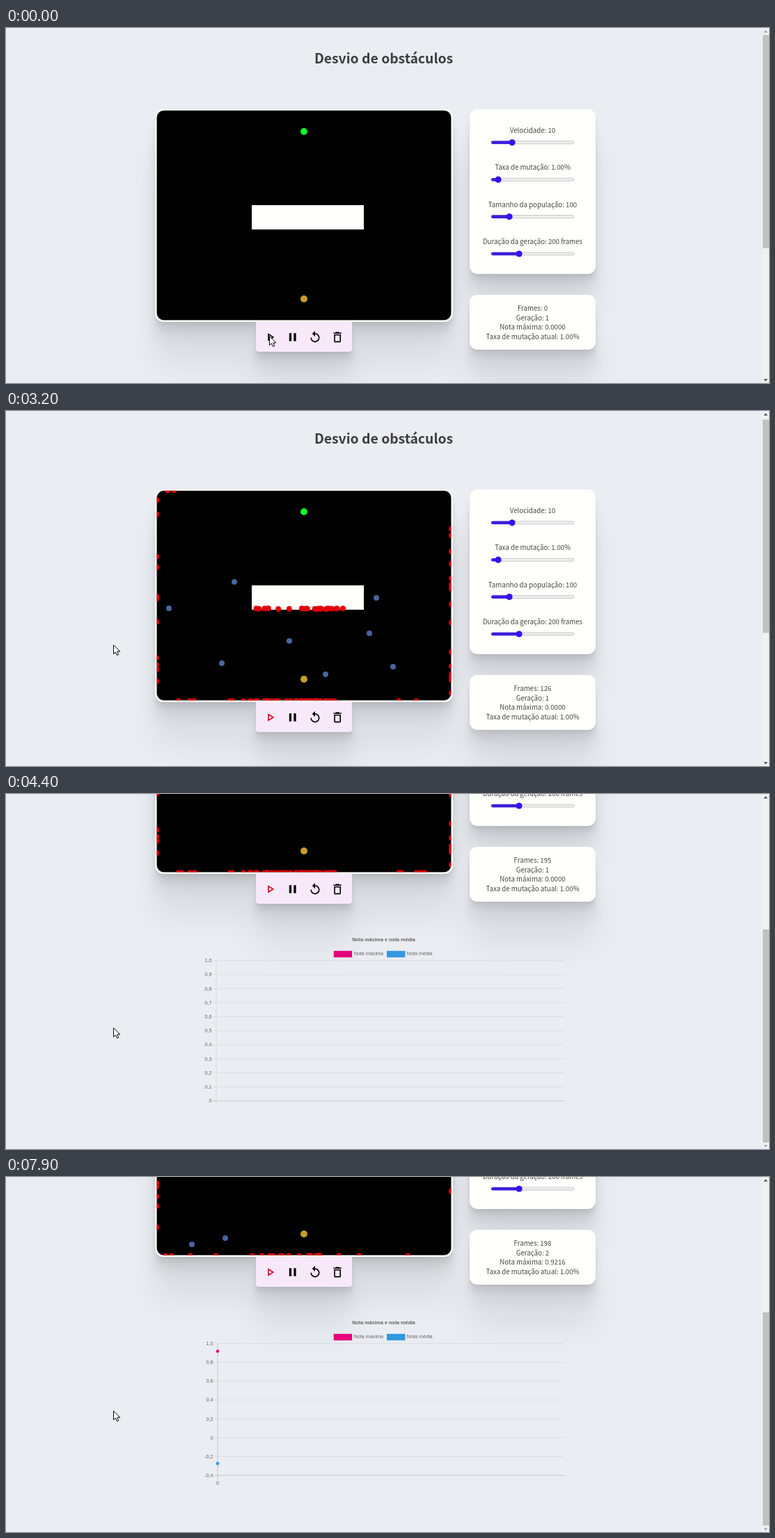
An HTML page with a canvas that plays this animation: 1096x511 px, repeating every 8 s.

```html
<!DOCTYPE html>
<html lang="pt">
<head>
<meta charset="utf-8">
<title>Desvio de obstáculos</title>
<style>
html, body { margin: 0; width: 100%; height: 100%; overflow: hidden; background: #eaedf2; }
#stage { position: relative; width: 1096px; height: 511px; overflow: hidden; }
#page { position: absolute; left: 0; top: 0; width: 1096px; height: 819px; }
#page > *, #over { position: absolute; }
.box {
  box-sizing: border-box; background: #fffffc;
  box-shadow: 0 1.7px 1.3px rgba(0,0,0,.02), 0 4px 3.2px rgba(0,0,0,.028),
    0 7.5px 6px rgba(0,0,0,.035), 0 13.4px 10.7px rgba(0,0,0,.042),
    0 25px 20px rgba(0,0,0,.05), 0 60px 48px rgba(0,0,0,.07);
}
#frame { left: 214px; top: 116.5px; width: 428px; height: 306.5px; border-radius: 12px; }
#bar { left: 359px; top: 423px; width: 138px; height: 43px; border-radius: 0 0 4px 4px; background: #f8e9fa; }
#params { left: 666px; top: 117px; width: 181px; height: 237px; border-radius: 11px; }
#stats { left: 666px; top: 384px; width: 181px; height: 79px; border-radius: 11px; }
#field { left: 216px; top: 118px; background: #000; clip-path: inset(.7px .6px .5px round 10px); }
svg { left: 0; top: 0; }
.ui { font: 9.68px "Noto Sans CJK JP", "Noto Sans CJK SC", "Open Sans", sans-serif; fill: #444; text-anchor: middle; }
.ui .title { font-size: 19.35px; font-weight: 700; fill: #3c3c3c; }
.chart { font: 7.2px "Liberation Sans", Arial, sans-serif; fill: #666; }
.chart line { stroke: rgba(0,0,0,.1); stroke-width: .7; }
.chart line.edge { stroke: rgba(0,0,0,.24); }
</style>
</head>
<body>
<div id="stage">
  <div id="page">
    <div class="box" id="frame"></div>
    <div class="box" id="bar"></div>
    <div class="box" id="params"></div>
    <div class="box" id="stats"></div>
    <canvas id="field" width="424" height="303"></canvas>
    <svg width="1096" height="819">
      <g class="ui" id="ui"><text class="title" x="542.5" y="51">Desvio de obstáculos</text></g>
      <g id="icons">
        <path id="play" d="M10 8.64L15.27 12 10 15.36V8.64M8 5v14l11-7z"/>
        <path d="M6 19h4V5H6zM14 5v14h4V5z"/>
        <path d="M12 5V1L7 6l5 5V7c3.31 0 6 2.69 6 6s-2.69 6-6 6-6-2.69-6-6H4c0 4.42 3.58 8 8 8s8-3.58 8-8-3.58-8-8-8z"/>
        <path d="M6 19c0 1.1.9 2 2 2h8c1.1 0 2-.9 2-2V7H6zM8 9h8v10H8zm7.5-5l-1-1h-5l-1 1H5v2h14V4z"/>
      </g>
      <g class="chart">
        <text x="542.5" y="520.4" text-anchor="middle" font-weight="700">Nota máxima e nota média</text>
        <rect x="470.7" y="533.8" width="26.4" height="9.4" fill="#e6007e"/>
        <text x="499.7" y="540.2">Nota máxima</text>
        <rect x="547" y="533.8" width="26.4" height="9.4" fill="#3498e0"/>
        <text x="575.8" y="540.2">Nota média</text>
        <g id="empty"></g>
        <g id="scored"></g>
      </g>
    </svg>
  </div>
  <svg id="over" width="1096" height="511">
    <rect x="1086" width="10" height="511" fill="#f1f1f1"/>
    <rect id="thumb" x="1087" width="9" height="307" fill="#c1c1c1"/>
    <path id="up" d="M1088.3 6.5h5.8l-2.9-3.4z"/>
    <path id="down" d="M1088.3 505.3h5.8l-2.9 3.4z"/>
    <g id="cursor" fill="#fff" stroke="#000" stroke-linejoin="round">
      <path id="arrow" d="M.5 .8V13.6L3.4 11 5.6 15.6 7.8 14.6 5.7 10.1H9.8Z"/>
      <path id="hand" d="M2.3 9.6V1.6Q3.5 0 4.7 1.6V5.6Q7 4.7 7.7 6.3Q9.3 5.3 10 6.9Q12 6.3 12.2 8.3V11.5Q12 13.5 11 15.6H3.8Q2.5 13-.8 10.4Q-1.5 8.5 .6 8.7Z"/>
    </g>
  </svg>
</div>
<script>
const $ = id => document.getElementById(id);
const clamp = (v, lo, hi) => Math.min(hi, Math.max(lo, v));

function add(parent, tag, attrs, text = "") {
  const el = document.createElementNS("http://www.w3.org/2000/svg", tag);
  for (const k in attrs) el.setAttribute(k, attrs[k]);
  el.textContent = text;
  return parent.appendChild(el);
}

// Linear path through keys [time, ...values].
function track(t, keys) {
  const i = keys.findIndex(k => k[0] > t);
  if (i < 0) return keys[keys.length - 1].slice(1);
  if (!i) return keys[0].slice(1);
  const a = keys[i - 1], b = keys[i], u = (t - a[0]) / (b[0] - a[0]);
  return a.slice(1).map((v, j) => v + (b[j + 1] - v) * u);
}

/* ---- panels ---- */
const label = (y, text) => add($("ui"), "text", { x: 756.5, y }, text);

[["Velocidade: 10", 727], ["Taxa de mutação: 1.00%", 707],
 ["Tamanho da população: 100", 723], ["Duração da geração: 200 frames", 737]].forEach(([text, x], i) => {
  const y = 164.8 + i * 53.4;
  label(y - 13.8, text);
  add($("ui"), "rect", { x: 697.3, y: y - 2, width: 118.4, height: 4, rx: 2, fill: "#efefef", stroke: "#b2b2b2", "stroke-width": .7 });
  add($("ui"), "rect", { x: 697, y: y - 2.3, width: x - 697, height: 4.6, rx: 2.3, fill: "#3a1fdc" });
  add($("ui"), "circle", { cx: x, cy: y, r: 4.6, fill: "#3512f2" });
});

const [count, gen, best] = [0, 1, 2].map(i => label(407 + i * 13.6));
label(447.8, "Taxa de mutação atual: 1.00%");

[...$("icons").children].forEach((el, i) =>
  el.setAttribute("transform", `translate(${379.5 + i * 32.2} 445) scale(.82) translate(-12 -12)`));

/* ---- chart ---- */
const CHART_TOP = 547.7;

function axes(g, x, bottom, rows, low, step) {
  for (let i = 0; i < rows; i++) {
    const y = bottom - i * (bottom - CHART_TOP) / (rows - 1);
    const v = low + i * step;
    const text = Math.abs(v) < .01 ? "0" : v.toFixed(1).replace(".", ",");
    add(g, "line", { x1: x - 5, x2: 802, y1: y, y2: y, class: i ? "" : "edge" });
    add(g, "text", { x: x - 6.6, y: y + 2.4, "text-anchor": "end" }, text);
  }
  return add(g, "line", { x1: x, x2: x, y1: CHART_TOP, y2: bottom + 5 });
}
axes($("empty"), 302, 749.8, 11, 0, .1);
axes($("scored"), 304, 737.4, 8, -.4, .2).setAttribute("class", "edge");
add($("scored"), "text", { x: 304, y: 751, "text-anchor": "middle" }, "0");
const [peak, mean] = ["#e6007e", "#3498e0"].map(fill => add($("scored"), "circle", { cx: 304, r: 2.3, fill }));

/* ---- population ---- */
const START = [428, 390];
const LEFT = 216, RIGHT = 640, TOP = 118, FLOOR = 421.5;

let seed = 1;
const rand = () => (seed = seed * 16807 % 2147483647) / 2147483647;
const between = (a, b) => a + (b - a) * rand();
const bell = () => (rand() + rand() + rand() - 1.5) * 2;

// A dot speeds up along (dx, dy), its offset at frame `mid`, and is pulled away after frame `turn`.
function place({ dx, dy, mid, turn, pull }, f) {
  const k = f / mid, drift = .07 * Math.max(0, f - turn) ** 2;
  return [START[0] + dx * k ** 1.3 + pull[0] * drift, START[1] + dy * k ** 1.7 + pull[1] * drift];
}

const hits = ([x, y]) => x < LEFT || x > RIGHT || y < TOP || y > FLOOR ||
  (x > 353 && x < 514 && y > 256 && y < 289);

function crash(dot) {
  let f = 0;
  while (f < 220 && !hits(place(dot, f))) f += .25;
  const [x, y] = place(dot, f);
  return { ...dot, end: f, rest: [clamp(x, LEFT, RIGHT), clamp(y, TOP, FLOOR)] };
}

function population({ start, mid, late, falling, early, rise, survivors }) {
  seed = start;
  const dots = survivors.map(([x, y]) => ({
    dx: (x - START[0]) * (mid / late) ** 1.3, dy: (y - START[1]) * (mid / late) ** 1.7,
    mid, turn: late, pull: [0, 1]
  }));
  while (dots.length < 100) {
    const sinks = dots.length < survivors.length + early;
    const dx = bell() * (sinks ? 45 : 64) - 12;
    const dy = sinks ? between(36, 80) : between(-rise, 27);
    const size = Math.hypot(dx, dy);
    const pull = rand() < falling ? [0, 1] : [dx / size, dy / size];
    dots.push({ dx, dy, mid, turn: mid + between(0, 25), pull });
  }
  return dots.map(crash);
}

const first = population({
  start: 11, mid: 38, late: 126, falling: .4, early: 22, rise: 96,
  survivors: [[328, 250], [234, 288], [310, 367], [407, 335], [522, 324], [532, 273], [556, 372], [459, 383]]
});
const second = population({
  start: 29, mid: 62, late: 198, falling: .2, early: 9, rise: 165,
  survivors: [[267, 405], [315, 396]]
});

const ctx = $("field").getContext("2d");
ctx.translate(-216, -118);

function disc([x, y], r, color) {
  ctx.fillStyle = color;
  ctx.beginPath();
  ctx.arc(x, y, r, 0, 7);
  ctx.fill();
}

function drawField(dots, f) {
  ctx.clearRect(216, 118, 424, 303);
  ctx.fillStyle = "#fffffc";
  ctx.fillRect(353, 255, 161, 35);
  if (f > 0) {
    for (const dot of dots) {
      if (f < dot.end) disc(place(dot, f), 4, "rgba(106,142,228,.7)");
      else disc(dot.rest, 4, "#e0000a");
    }
  }
  disc([428, 149], 5, "#12fb28");
  disc(START, 5, "#c6a026");
}

/* ---- timeline ---- */
const RUN1 = [[1056, 0], [1700, 38], [3200, 126], [3700, 156], [4400, 195], [4485, 200]];
const RUN2 = [[4549, 0], [5600, 62], [7900, 198]];
const MOUSE = [[1000, 378, 443], [1700, 172, 359], [1900, 153.5, 336]];

function draw(t) {
  const again = t >= 4500;
  const f = Math.round(track(t, again ? RUN2 : RUN1)[0]);
  drawField(again ? second : first, f);
  count.textContent = "Frames: " + f;
  gen.textContent = "Geração: " + (again ? 2 : 1);
  best.textContent = "Nota máxima: " + (again ? "0.9216" : "0.0000");

  $("empty").style.display = again ? "none" : "";
  $("scored").style.display = again ? "" : "none";
  const k = 1 - (1 - clamp((t - 4500) / 1000, 0, 1)) ** 4;
  peak.setAttribute("cy", 683.2 - 124.4 * k);
  mean.setAttribute("cy", 683.2 + 37.2 * k);

  const u = clamp((t - 3140) / 872, 0, 1);
  const scroll = Math.round(308 * u * u * (3 - 2 * u));
  $("page").style.top = -scroll + "px";
  $("thumb").setAttribute("y", 10 + scroll * .6);
  $("up").setAttribute("fill", scroll > 0 ? "#505050" : "#a3a3a3");
  $("down").setAttribute("fill", scroll < 308 ? "#505050" : "#a3a3a3");

  $("play").setAttribute("fill", t >= 900 ? "#d00020" : "#000");
  const pointing = t >= 100 && t < 1100;
  $("hand").style.display = pointing ? "" : "none";
  $("arrow").style.display = pointing ? "none" : "";
  $("cursor").setAttribute("transform", `translate(${track(t, MOUSE).map(Math.round)})`);
}

function tick() {
  draw(Math.floor(performance.now() % 8000 / 100) * 100);
  requestAnimationFrame(tick);
}
tick();
</script>
</body>
</html>
```
